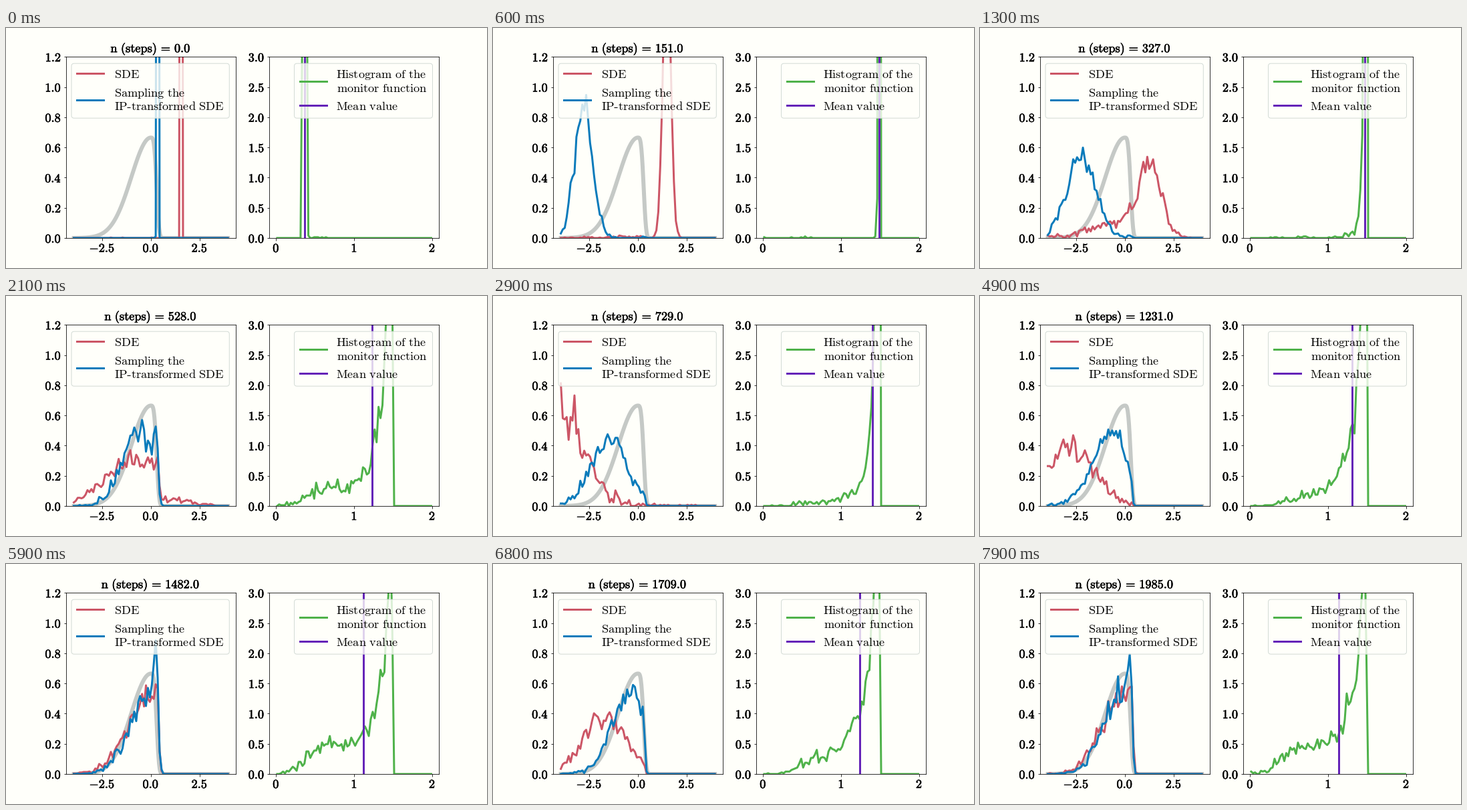
A matplotlib script that plays this animation: 720 by 360 pixels, repeating every 8000 ms.

```python
import numpy as np
import matplotlib.pyplot as plt
from matplotlib.animation import FuncAnimation
from matplotlib.patches import FancyBboxPatch
from matplotlib.patheffects import withStroke

plt.rcParams["mathtext.fontset"] = "cm"

BG, GREY, EDGE = "#fffffa", "#c5c9c6", "#d3dbd6"
RED, BLUE, GREEN, PURPLE = "#cc5666", "#0a7bbb", "#4fb24a", "#6524b8"
FONT = 18.3
BOLD = [withStroke(linewidth=0.6, foreground="k")]
FRAMES, SAMPLES, BINS = 80, 3000, 80
WALL = 0.38

grid = np.linspace(-7, 4, 13001)
x_edges = np.linspace(-4, 4, BINS + 1)
g_edges = np.linspace(0, 2, BINS + 1)


def centres(edges):
    return (edges[1:] + edges[:-1]) / 2


def bell(mode, left, right):
    side = np.where(grid < mode, left, right)
    return np.exp(-0.5 * ((grid - mode) / side) ** 2)


def well(mode, left, swing):
    """Skewed bell cut off by the steep wall; wider to the right when far out."""
    right = left * min(1, 0.5 + 0.35 * swing)
    return bell(mode, left, right) / (1 + np.exp((grid - WALL) / 0.03))


def mix(a, b, share):
    return (1 - share) * a / a.sum() + share * b / b.sum()


def bounce(i, half, amp, decay):
    """Damped rebound off the wall: relative and absolute distance from it."""
    rel = abs(np.sin(np.pi * i / half))
    return rel, amp * np.exp(-i / decay) * rel


def ip_pdf(i):
    rel, swing = bounce(i, 19.2, 4.4, 27)
    spread = 0.006 + 1 - np.exp(-i / 10)
    mode = 0.05 + 0.32 * np.exp(-i / 5) - swing
    pile = 0.2 * spread * (1 - rel) ** 2
    return mix(well(mode, spread, swing), bell(0.27, 0.1, 0.1), pile)


def sde_pdf(i):
    # A packet diffuses beyond the wall, then drops into the well
    waiting = 1 / (1 + np.exp((i - 16) / 2.6))
    rel, swing = bounce(i, 19.7, 9.1, 41)
    swing *= (1 - waiting) ** 2
    inside = mix(well(-swing, 1 + 0.8 * np.exp(-i / 40), swing),
                 bell(0.35, 0.08, 0.08), 0.06 * (1 - rel) ** 2)
    width = 0.008 + 0.58 * (i / 13) ** 1.5
    packet = bell(1.55 - 0.3 * (i / 13) ** 2, width, width)
    return mix(inside, packet, waiting)


def sample(rng, pdf):
    cdf = np.cumsum(pdf)
    return np.interp(rng.random(SAMPLES), cdf / cdf[-1], grid)


def density(values, edges):
    return np.histogram(values, edges, density=True)[0]


def monitor(x):
    return 1.487 - 0.52 * np.exp(2.1 * x)


def invariant(x):
    right = np.exp(-np.log(2) * (np.abs(x) / 0.3) ** 3.5)
    return 0.665 * np.where(x < 0, np.exp(-x * x / 2), right)


def rm(text):
    return r"$\mathrm{" + text.replace(" ", r"\ ") + "}$"


fig, (ax, bx) = plt.subplots(1, 2, figsize=(10, 5), dpi=72, facecolor=BG)
fig.subplots_adjust(left=0.125, right=0.9, bottom=0.125, top=0.88, wspace=0.2)


def setup(a, edges, ymax, xticks, yticks, xform):
    xs = centres(edges)
    pad = 0.05 * (xs[-1] - xs[0])
    a.set(xlim=(xs[0] - pad, xs[-1] + pad), ylim=(0, ymax), facecolor=BG)
    a.set_xticks(xticks, [f"${v:{xform}}$" for v in xticks])
    a.set_yticks(yticks, [f"${v:.1f}$" for v in yticks])
    for text in a.get_xticklabels() + a.get_yticklabels():
        text.set(fontsize=FONT, path_effects=BOLD)


setup(ax, x_edges, 1.2, [-2.5, 0, 2.5], np.arange(7) * 0.2, ".1f")
setup(bx, g_edges, 3, [0, 1, 2], np.arange(7) * 0.5, "d")

fine = np.linspace(-3.95, 3.95, 500)
ax.plot(fine, invariant(fine), color=GREY, lw=6)
sde_line, = ax.plot([], [], color=RED, lw=3)
ip_line, = ax.plot([], [], color=BLUE, lw=3)
hist_line, = bx.plot([], [], color=GREEN, lw=3)
mean_line = bx.axvline(0, color=PURPLE, lw=3)

# Overlay in pixel coordinates for the title and the legends
top = fig.add_axes([0, 0, 1, 1])
top.set(xlim=(0, 720), ylim=(360, 0))
top.axis("off")


def label(x, y, text, **kw):
    return top.text(x, y, text, fontsize=FONT, va="baseline", **kw)


def box(x, w):
    for style in (dict(fc=BG, ec="none", alpha=0.8), dict(fc="none", ec=EDGE)):
        top.add_patch(FancyBboxPatch(
            (x, 53.2), w, 82, boxstyle="round,pad=0,rounding_size=4",
            lw=1, **style))


def handle(x, y, color):
    top.plot([x, x + 40], [y, y], color=color, lw=3)


box(98, 236.3)
handle(106, 68, RED)
handle(106, 107.8, BLUE)
label(161.6, 75.2, rm("SDE"))
label(161.6, 102.7, rm("Sampling the"))
label(161.6, 122.8, rm("IP"))
# Math mode would turn the hyphen into a minus, so it is drawn
top.plot([181.3, 185.9], [118.8, 118.8], color="k", lw=1.1,
         solid_capstyle="butt")
label(186.9, 122.8, rm("transformed SDE"))

box(431.5, 207)
handle(439.5, 80, GREEN)
handle(439.5, 115.8, PURPLE)
label(494.3, 75.2, rm("Histogram of the"))
label(495, 95.8, rm("monitor function"))
label(494.3, 122.8, rm("Mean value"))

title = label(216.5, 36.2, "", ha="center", path_effects=BOLD)


def update(i):
    rng = np.random.default_rng(100 + i)
    sde = sample(rng, sde_pdf(i))
    ip = sample(rng, ip_pdf(i))
    g = monitor(ip)
    sde_line.set_data(centres(x_edges), density(sde, x_edges))
    ip_line.set_data(centres(x_edges), density(ip, x_edges))
    hist_line.set_data(centres(g_edges), density(g, g_edges))
    mean_line.set_xdata([g.mean()] * 2)
    n = round(i * 5000 / 199)
    title.set_text(r"$\mathrm{n\ (steps)\,=\,%d.0}$" % n)
    return sde_line, ip_line, hist_line, mean_line, title


anim = FuncAnimation(fig, update, frames=FRAMES, interval=100,
                     repeat=True, repeat_delay=0, blit=False)
plt.show()
```
